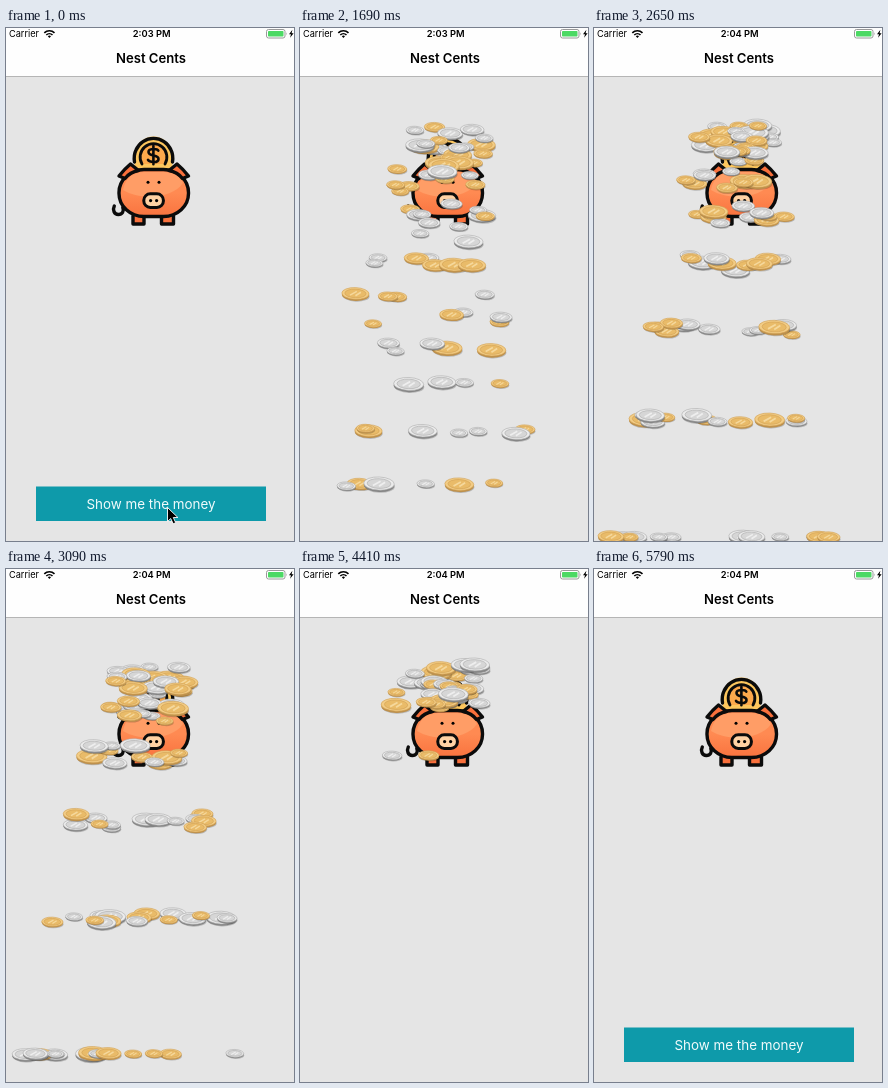
Recreate the animation shown at these times as an HTML page with a canvas. Size 288 by 513 pixels, loop 6.87 s.

```html
<!DOCTYPE html>
<html lang="en">
<head>
<meta charset="utf-8">
<style>
  html, body { margin: 0; width: 100%; height: 100%; overflow: hidden; background: #e5e5e5; }
  svg, canvas { position: absolute; left: 0; top: 0; width: 100vw; height: 100vh; }
  text { font-family: Inter, Roboto, sans-serif; }
  .line { fill: none; stroke: #0b0b0b; stroke-width: 3.4; stroke-linecap: round; stroke-linejoin: round; }
</style>
</head>
<body>
<svg viewBox="0 0 288 513">
  <defs>
    <linearGradient id="skin" x1="0" y1="0" x2="0" y2="1">
      <stop offset=".5" stop-color="#ff8a52"/>
      <stop offset="1" stop-color="#f9733f"/>
    </linearGradient>
  </defs>
  <rect width="288" height="513" fill="#e5e5e5"/>
  <rect width="288" height="48" fill="#fefefe"/>
  <rect y="48" width="288" height="1" fill="#b5b5b5"/>

  <!-- status bar -->
  <text x="3" y="9.4" font-size="9.2">Carrier</text>
  <g fill="none" stroke="#000" stroke-width="1.6">
    <path d="M38.3 4.9a7.2 7.2 0 0 1 10.2 0M40.3 7a4.4 4.4 0 0 1 6.2 0"/>
    <path d="M43.4 10l-1.6-1.7a2.3 2.3 0 0 1 3.2 0z" fill="#000" stroke="none"/>
  </g>
  <text id="clock" x="145.7" y="9.4" font-size="9.3" font-weight="600" text-anchor="middle"></text>
  <rect x="260.5" y="1.5" width="18.5" height="8.5" rx="2" fill="#fff" stroke="#999"/>
  <rect x="262" y="3" width="15.5" height="5.5" rx=".8" fill="#4cd964"/>
  <path d="M280.2 4.2q1.3 1.5 0 3z" fill="#999"/>
  <path d="M286.4 1.8l-3.4 4.4h2l-.9 3.6 3.5-4.6h-2z"/>
  <text x="145" y="35.3" font-size="13.1" font-weight="600" text-anchor="middle">Nest Cents</text>

  <!-- piggy bank -->
  <g id="pig">
    <path d="M128.5 145v-17a19 19.500 0 0 1 38 0v17z" fill="#fdc65d"/>
    <path class="line" d="M128.500 134q-1-7 1.500-12a19 19 0 0 1 35 0q2.500 5 1.500 12"/>
    <path class="line" style="fill:#fda94c;stroke-width:2.8" d="M136 136a13.400 13.400 0 1 1 23 0"/>
    <path class="line" style="stroke-width:2.6" d="M152.300 122.600c-1.200-2-9.800-2.600-9.800 1.500 0 4.800 10 2.200 10 6.800 0 4.400-9 3.600-10.500 1M147.400 117.800v18.400"/>
    <path class="line" style="fill:#f9703c" d="M127 188v8h11v-8M155.500 188v8h12v-8"/>
    <path class="line" d="M108.300 178c-2 4 0 8.500 4 8.500s6-3.500 4.500-7"/>
    <rect class="line" style="fill:url(#skin)" x="113" y="141.500" width="69.500" height="47" rx="25" ry="23"/>
    <path d="M117 162c2-12 10-18 22-18h18c9 0 17 3 20 11-10 15-42 18-60 7z" fill="#ff9d66"/>
    <path id="ear" class="line" style="fill:#f9703c" d="M132.500 142.500l-8-6.500q-6 5-11.500 12l6 2.500q5-6.500 13.500-8z"/>
    <use href="#ear" transform="translate(295.500) scale(-1 1)"/>
    <circle cx="142" cy="154.300" r="1.500"/>
    <circle cx="153" cy="154.300" r="1.500"/>
    <rect class="line" style="fill:#ffd2a4;stroke-width:3" x="137.800" y="165.800" width="19.600" height="13.600" rx="6.500"/>
    <circle cx="144.600" cy="172.600" r="1.600"/>
    <circle cx="150.600" cy="172.600" r="1.600"/>
  </g>

  <g id="button">
    <rect x="30" y="458.500" width="230" height="34.500" fill="#0e9aaa"/>
    <text x="145" y="480.800" font-size="13.400" fill="#f2fbfc" text-anchor="middle">Show me the money</text>
  </g>
  <path id="cursor" d="M161.500 479.500v14l3.200-3 2.500 5.300 2.500-1.100-2.400-5.200h4.600z" stroke="#fff" stroke-width=".9"/>
</svg>
<canvas id="stage"></canvas>
<script>
const LOOP = 6870, TAP = 620, DONE = 5150, REST = 5790, MINUTE = 1820;
const COUNT = 246, GAP = 12, LEAD = 79, FLIGHT = 1115, LINGER = 90;
const el = id => document.getElementById(id);
const canvas = el('stage'), ctx = canvas.getContext('2d');
const dpr = window.devicePixelRatio || 1;
canvas.width = 288 * dpr;
canvas.height = 513 * dpr;
ctx.scale(dpr, dpr);

let seed = 41;
const rand = (lo, hi) => {
  seed = (seed * 16807) % 2147483647;
  return lo + (hi - lo) * seed / 2147483647;
};

// Launches bunch into rows, each row 10% later than the one before.
function bunch(delay) {
  const step = Math.log(1.1), last = 2838;
  if (delay < GAP) return delay;
  const row = Math.ceil(Math.log(delay / last) / step);
  return Math.min(3110, last * Math.exp(step * row));
}

const coins = Array.from({ length: COUNT }, (_, i) => ({
  start: TAP + LEAD + bunch(i * GAP - LEAD),
  x0: rand(14, 238), x1: rand(110, 184),
  y0: 519, y1: rand(96, 120),
  r: 8.5 + 7 * rand(0, 1) ** 1.6, gold: rand(0, 1) < .5
}));

const GOLD = { edge: '#bd904c', rim: '#f2cc85', face: '#e9bb69', mark: '#f5d89c', line: '#d0a052' };
const SILVER = { edge: '#858585', rim: '#ebebeb', face: '#d6d6d6', mark: '#eee', line: '#acacac' };

function oval(x, y, rx, ry, fill, stroke) {
  ctx.beginPath();
  ctx.ellipse(x, y, rx, ry, .04, 0, 7);
  ctx.fillStyle = fill;
  ctx.fill();
  if (stroke) {
    ctx.strokeStyle = stroke;
    ctx.lineWidth = .6;
    ctx.stroke();
  }
}

function drawCoin(x, y, r, c) {
  const h = r * .43;
  oval(x + .6, y + r * .1 + .5, r, h, 'rgba(0,0,0,.2)');
  oval(x, y + r * .08, r, h, c.edge);
  oval(x, y - r * .04, r, h, c.rim, c.line);
  oval(x, y - r * .04, r * .78, h * .74, c.face, c.line);
  ctx.strokeStyle = c.mark;
  ctx.lineWidth = r * .12;
  ctx.beginPath();
  ctx.moveTo(x - r * .4, y + h * .2);
  ctx.lineTo(x + r * .1, y - h * .45);
  ctx.moveTo(x, y + h * .3);
  ctx.lineTo(x + r * .4, y - h * .3);
  ctx.stroke();
}

function draw(now) {
  const t = now % LOOP;
  el('cursor').style.display = t < TAP ? '' : 'none';
  el('button').style.display = t < TAP || t >= DONE ? '' : 'none';
  el('clock').textContent = t < MINUTE ? '2:03 PM' : '2:04 PM';

  const p = Math.min(1, Math.max(0, (t - DONE) / (REST - DONE)));
  const s = 1 + .03 * Math.sin(Math.PI * p);
  el('pig').setAttribute('transform', `translate(147 152) scale(${s}) translate(-147 -152)`);

  ctx.clearRect(0, 0, 288, 513);
  for (const c of coins) {
    const age = t - c.start;
    if (age < 0 || age > FLIGHT + LINGER) continue;
    const left = 1 - Math.min(1, age / FLIGHT);
    const x = c.x1 + (c.x0 - c.x1) * left;
    const y = c.y1 + (c.y0 - c.y1) * left * left;
    drawCoin(x, y, c.r, c.gold ? GOLD : SILVER);
  }
}

const begin = performance.now();
function tick() {
  draw(performance.now() - begin);
  requestAnimationFrame(tick);
}
tick();
</script>
</body>
</html>
```
